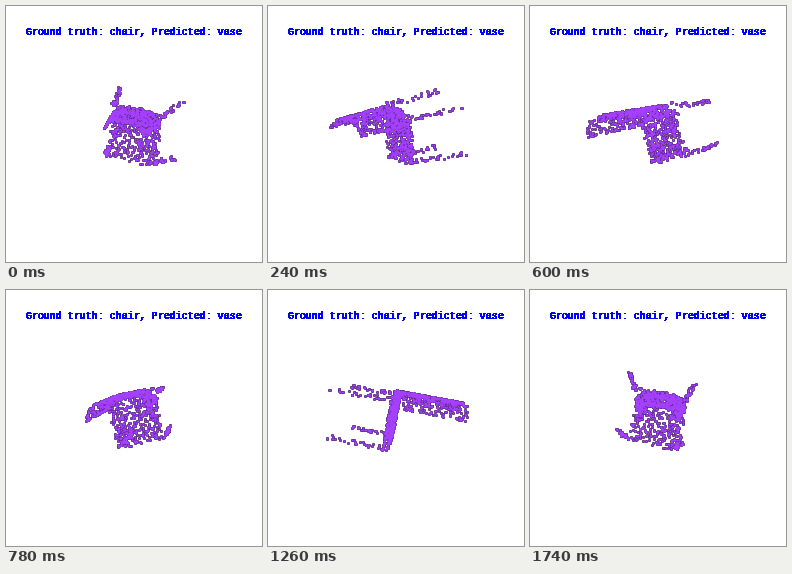
Recreate the animation shown at these times as a matplotlib script. Size 256 by 256 pixels, loop 1.8 s.

```python
import matplotlib.pyplot as plt
import numpy as np
from matplotlib.animation import FuncAnimation

SIZE, DPI = 256, 100
STEPS, INTERVAL = 30, 60
CAM = 250          # camera distance, in pixels
PX = 72 / DPI      # points per pixel

plt.rcParams["text.hinting_factor"] = 1
rng = np.random.default_rng(7)

# Chair frame: x right, y up, z towards the viewer
WIDTH = np.array([0.959, -0.204, -0.194])
DOWN = np.array([-0.12, -0.97, 0.21])


def quad(a, b, c, d, u, t):
    a, b, c, d = map(np.array, (a, b, c, d))
    return (1 - t) * ((1 - u) * a + u * b) + t * ((1 - u) * c + u * d)


def seat(a, b, c, d, n, thick):
    """Flat slab: points on both faces of a quad."""
    u, t = rng.random((2, n, 1))
    normal = np.cross(WIDTH, DOWN)
    return quad(a, b, c, d, u, t) + rng.choice([-1, 1], (n, 1)) * thick * normal


def backrest(a, b, c, d, n, lip):
    """Panel whose two long sides curl down."""
    v = np.sin(np.pi / 2 * rng.uniform(-1, 1, (n, 1)))
    t = rng.random((n, 1))
    return quad(a, b, c, d, (v + 1) / 2, t) + lip * v ** 6 * DOWN


def leg(root, tip, n=31, r=1.9):
    root, tip = np.array(root), np.array(tip)
    t = rng.random((n, 1))
    off = rng.uniform(-r, r, (2, n, 1))
    return root + t * (tip - root) + off[0] * WIDTH + off[1] * DOWN


top_l, top_r = (-20.5, 31, 2.9), (27.5, 21.5, -6.8)
low_l, low_r = (-25.5, -22, 14.9), (22.5, -32, 5)
end_l, end_r = (-36, 18, -62), (12, 9, -71)

cloud = np.vstack([
    seat(top_l, top_r, low_l, low_r, 410, 2.0),
    backrest(top_l, top_r, end_l, end_r, 450, 12),
    leg((-22, 27, 6), (-9.8, 36, 61)),
    leg((26.5, 17, -2), (39.3, 26, 51)),
    leg((-28, -19, 13), (-18.5, -9, 66)),
    leg((18, -28, 8), (30, -18, 60)),
])


def project(step):
    a = 2 * np.pi * step / STEPS
    x, y, z = cloud.T
    p = CAM / (CAM - z * np.cos(a) + x * np.sin(a))
    sx = SIZE / 2 + (x * np.cos(a) + z * np.sin(a)) * p
    return np.column_stack([sx, SIZE / 2 - y * p])


fig = plt.figure(figsize=(SIZE / DPI, SIZE / DPI), dpi=DPI, facecolor="white")
ax = fig.add_axes([0, 0, 1, 1])
ax.set_xlim(0, SIZE)
ax.set_ylim(SIZE, 0)
ax.axis("off")

# Drawn twice, one pixel apart, for heavy bitmap-like strokes
for x in (19, 20):
    ax.text(x, 29, "Ground truth: chair, Predicted: vase", color="#0000ff",
            family="Liberation Mono", weight="bold", size=10 * PX,
            va="baseline", antialiased=False)


def dots(diameter, color):
    return ax.scatter(*project(0).T, s=(diameter * PX) ** 2, c=color,
                      linewidths=0, antialiased=False)


# Dark rims lie below all the fills
layers = dots(3.0, "black"), dots(2.4, "#a540ff")


def update(step):
    points = project(step)
    for layer in layers:
        layer.set_offsets(points)
    return layers


anim = FuncAnimation(fig, update, frames=STEPS, interval=INTERVAL,
                     repeat=True, repeat_delay=0)
plt.show()
```
